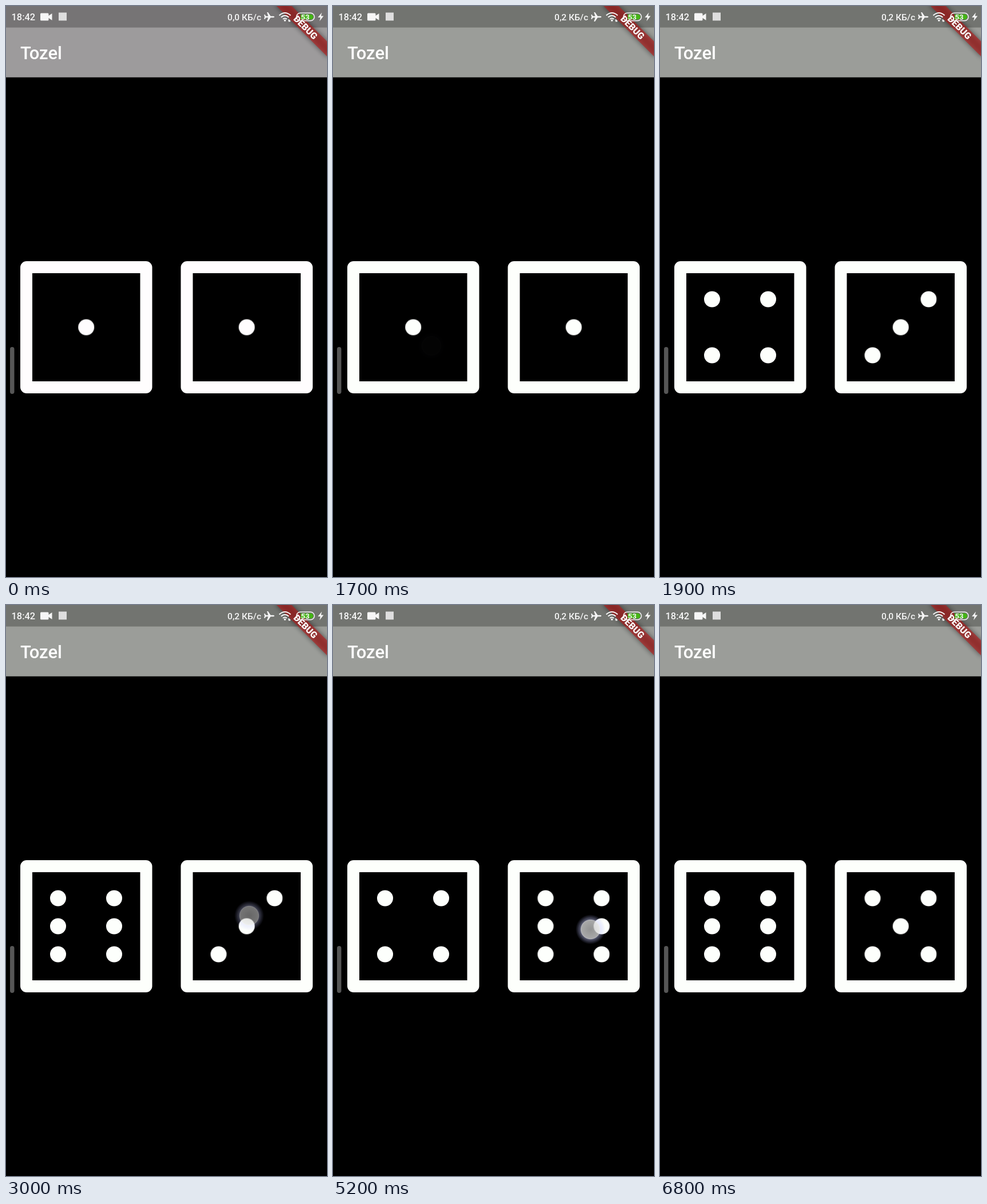
Recreate the animation shown at these times as an HTML page without scripts. Size 561 px wide and 998 px high, loop 7000 ms.

```html
<!DOCTYPE html>
<html lang="en">
<head>
<meta charset="utf-8">
<title>Dice roller</title>
<style>
html, body { margin: 0; width: 100%; height: 100%; overflow: hidden; background: #000; }
svg { display: block; width: 561px; height: 998px; font-family: Roboto, sans-serif; font-weight: 500; fill: #fff; }

/* every part shares the same 7 s clock */
.status, .bar, .white, .a, .b, .m, .c, .touch, .slow, .fast, .data { animation: 7s step-end infinite; }

.status { animation-name: status; animation-timing-function: linear; }
.bar { animation-name: bar; animation-timing-function: linear; }
.white { animation-name: white; }
@keyframes status { 0%, 8.57% { fill: #767475; } 18.57%, 100% { fill: #727470; } }
@keyframes bar { 0%, 8.57% { fill: #9d9b9c; } 18.57%, 100% { fill: #9b9d99; } }
@keyframes white { 0% { fill: #fffdfe; } 20% { fill: #fdfffc; } }

/* rolls at 1.8, 3.0, 4.1, 5.3 and 6.2 s */
.left .a, .b { animation-name: corners; }
.left .m { animation-name: left-middle; }
.left .c { animation-name: left-centre; }
.right .a { animation-name: right-corners; }
.right .m { animation-name: right-middle; }
.right .c { animation-name: right-centre; }
@keyframes corners { 0%, 75.71% { opacity: 0; } 25.71%, 88.57% { opacity: 1; } }
@keyframes left-middle { 0%, 58.57% { opacity: 0; } 42.85%, 88.57% { opacity: 1; } }
@keyframes left-centre { 0%, 75.71% { opacity: 1; } 25.71%, 88.57% { opacity: 0; } }
@keyframes right-corners { 0%, 75.71% { opacity: 0; } 58.57%, 88.57% { opacity: 1; } }
@keyframes right-middle { 0%, 75.71% { opacity: 0; } 58.57% { opacity: 1; } }
@keyframes right-centre { 0%, 75.71% { opacity: 1; } 58.57% { opacity: 0; } }

/* five taps, each fading on release */
.touch { animation-name: taps; }
@keyframes taps {
  0% { opacity: 0; transform: translate(172px, 594px); }
  20% { opacity: 1; transform: translate(172px, 594px); }
  22.85% { opacity: .5; transform: translate(172px, 594px); }
  24.28% { opacity: .02; transform: translate(172px, 594px); }
  25.71% { opacity: 0; transform: translate(425px, 543px); }
  41.42% { opacity: 1; transform: translate(425px, 543px); }
  42.85% { opacity: .7; transform: translate(425px, 543px); }
  44.28% { opacity: .3; transform: translate(425px, 543px); }
  45.71% { opacity: 0; transform: translate(214px, 598px); }
  57.14% { opacity: 1; transform: translate(214px, 598px); }
  58.57% { opacity: .7; transform: translate(214px, 598px); }
  60% { opacity: .3; transform: translate(214px, 598px); }
  61.42% { opacity: 0; transform: translate(450px, 567px); }
  74.28% { opacity: 1; transform: translate(450px, 567px); }
  75.71% { opacity: .7; transform: translate(450px, 567px); }
  77.14% { opacity: .3; transform: translate(450px, 567px); }
  78.57% { opacity: .08; transform: translate(450px, 567px); }
  80% { opacity: 0; transform: translate(461px, 534px); }
  87.14% { opacity: 1; transform: translate(461px, 534px); }
  88.57% { opacity: .4; transform: translate(461px, 534px); }
  90% { opacity: 0; transform: translate(461px, 534px); }
}

.slow { animation-name: slow; }
.fast { animation-name: fast; }
.data { animation-name: data; }
@keyframes slow { 0%, 77.14% { opacity: 1; } 20% { opacity: 0; } }
@keyframes fast { 0%, 77.14% { opacity: 0; } 20% { opacity: 1; } }
@keyframes data { 0%, 97.14% { opacity: 1; } 82.85% { opacity: 0; } }
</style>
</head>
<body>
<svg viewBox="0 0 561 998">
  <defs>
    <radialGradient id="glow">
      <stop offset="0" stop-color="#c4c4c4" stop-opacity=".75"/>
      <stop offset=".58" stop-color="#dcdcdc" stop-opacity=".76"/>
      <stop offset=".64" stop-color="#e6e6ec" stop-opacity=".78"/>
      <stop offset=".68" stop-color="#c8ccff" stop-opacity=".42"/>
      <stop offset="1" stop-color="#b0b4ff" stop-opacity="0"/>
    </radialGradient>
    <filter id="soft" x="-30%" y="-100%" width="160%" height="300%"><feGaussianBlur stdDeviation="5"/></filter>
    <circle id="pip" r="14"/>
    <g id="frame">
      <path fill-rule="evenodd" d="M36 446H244.500a11 11 0 0 1 11 11V666a11 11 0 0 1-11 11H36a11 11 0 0 1-11-11V457a11 11 0 0 1 11-11ZM46 467V656H234.500V467Z"/>
    </g>
    <g id="falling"><use href="#pip" x="91" y="512.500"/><use href="#pip" x="189" y="610.500"/></g>
    <g id="rising"><use href="#pip" x="189" y="512.500"/><use href="#pip" x="91" y="610.500"/></g>
    <g id="middle"><use href="#pip" x="91" y="561.500"/><use href="#pip" x="189" y="561.500"/></g>
  </defs>

  <rect width="561" height="998" fill="#000"/>
  <rect class="bar" y="37" width="561" height="87.700"/>
  <rect class="status" width="561" height="37.600"/>
  <text x="25" y="93" font-size="31">Tozel</text>

  <!-- corner ribbon -->
  <g transform="translate(561 0) rotate(45)">
    <rect x="-64" y="43.600" width="128" height="18.700" fill="#000" fill-opacity=".5" filter="url(#soft)"/>
    <rect x="-64" y="43.600" width="128" height="18.700" fill="#b71c1c" fill-opacity=".63"/>
    <text y="58.600" font-size="15.900" font-weight="900" text-anchor="middle">DEBUG</text>
  </g>

  <!-- status icons -->
  <g fill="#f6f6f6">
    <text x="9.500" y="24.800" font-size="16.400">18:42</text>
    <path d="M61.500 12.500h11.500q1.500 0 1.500 1.500v3l6-4v12l-6-4v3q0 1.500-1.500 1.500H61.500q-1.500 0-1.500-1.500v-10q0-1.500 1.500-1.500Z"/>
    <rect x="92" y="11.500" width="14" height="14" fill="#dedede"/>
    <g font-size="15.500" text-anchor="end">
      <text class="slow" x="446" y="24.600">0,0 КБ/с</text>
      <text class="fast" x="446" y="24.600">0,2 КБ/с</text>
    </g>
    <path d="M469 19q0-1.300-2-1.300h-4.500L458 11h-2l2.300 6.700h-4L452.500 15h-1.500l1 4-1 4h1.500l1.800-2.700h4L456 27h2l4.500-6.700H467q2 0 2-1.300Z"/>
    <g fill="none" stroke="#f6f6f6" stroke-width="2">
      <path d="M477.500 16.500q10-9 20 0M480.800 19.800q6.700-6 13.400 0M484 23q3.500-3 7 0"/>
    </g>
    <circle cx="487.500" cy="25.300" r="1.700"/>
    <path d="M494 27.500v-3"  stroke="#eee" stroke-width="1"/>
    <path class="data" d="M493 23.500h2.500v1.500h1.500v2.500h-2.500Z"/>
    <rect x="507.500" y="12.300" width="31.500" height="13.400" rx="6.700" fill="none" stroke="#f6f6f6" stroke-width="1.500"/>
    <path fill="#43b514" d="M515 14.500h17.500a4.500 4.500 0 0 1 0 9H515Z"/>
    <text x="523" y="23.600" font-size="13" font-weight="700" text-anchor="middle">53</text>
    <path d="M552 11.500l-7 8.500h4.500l-1.500 6.500 7-9h-4.500Z"/>
  </g>

  <rect x="7" y="596" width="7.500" height="82" rx="3.700" fill="#565656"/>

  <g class="white">
    <g class="left">
      <use href="#frame"/>
      <use class="a" href="#falling"/>
      <use class="b" href="#rising"/>
      <use class="m" href="#middle"/>
      <use class="c" href="#pip" x="140.200" y="561.500"/>
    </g>
    <g class="right" transform="translate(280.500 0)">
      <use href="#frame"/>
      <use class="a" href="#falling"/>
      <use class="b" href="#rising"/>
      <use class="m" href="#middle"/>
      <use class="c" href="#pip" x="140.200" y="561.500"/>
    </g>
  </g>

  <circle class="touch" r="26" fill="url(#glow)"/>
</svg>
</body>
</html>
```
